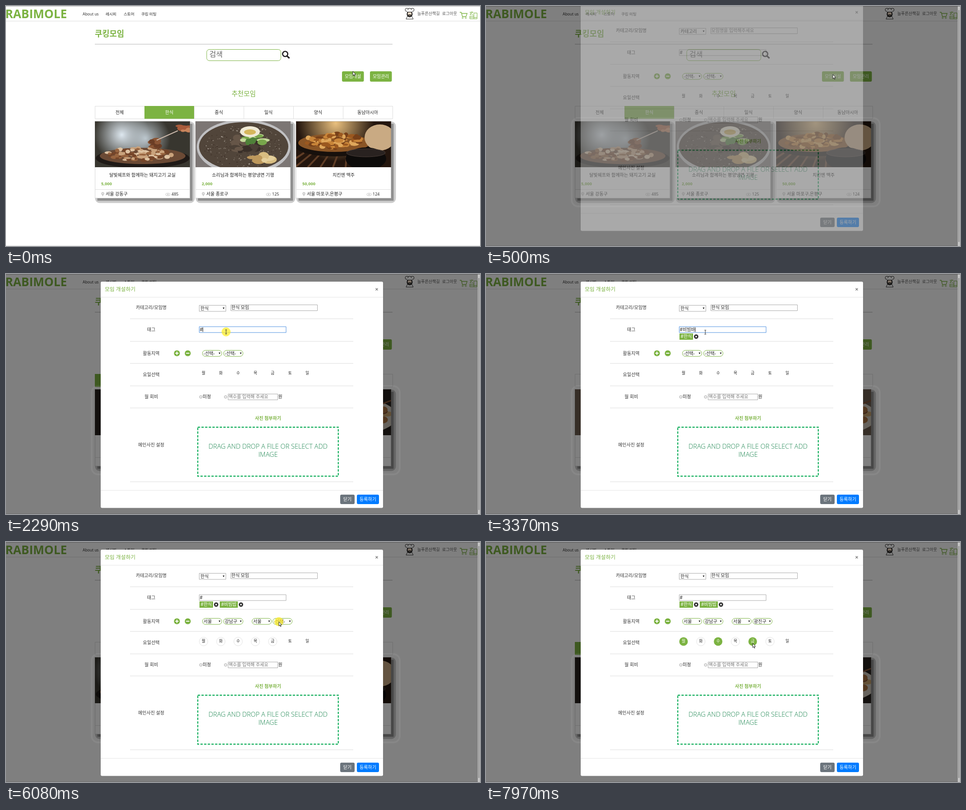
Write an HTML page with a canvas that moves like this. It is 1051 by 533 pixels and loops after 8000 ms.

```html
<!DOCTYPE html>
<html lang="ko">
<head>
<meta charset="utf-8">
<style>
html, body { margin: 0; width: 100%; height: 100%; overflow: hidden; background: #fff }
canvas { display: block }
</style>
</head>
<body>
<canvas id="stage" width="1051" height="533"></canvas>
<script>
const stage = document.getElementById('stage').getContext('2d');
const sheet = new OffscreenCanvas(1051, 533).getContext('2d');
const LOOP = 8000, GREEN = '#7cb342', TAU = Math.PI * 2;
const FONT = '"Open Sans", "Noto Sans CJK KR", "Noto Sans CJK", sans-serif';
let g = stage;

// ---- drawing helpers ----
function text(s, x, y, size, color = '#222', align = 'left', weight = 400) {
  g.font = `${weight} ${size}px ${FONT}`;
  g.textAlign = align;
  g.textBaseline = 'middle';
  g.fillStyle = color;
  g.fillText(s, x, y);
  return g.measureText(s).width;
}
function paint(fill, stroke, width) {
  if (fill) { g.fillStyle = fill; g.fill(); }
  if (stroke) { g.strokeStyle = stroke; g.lineWidth = width; g.stroke(); }
}
function rect(x, y, w, h, fill) { g.fillStyle = fill; g.fillRect(x, y, w, h); }
function box(x, y, w, h, r, fill, stroke, width = 1) {
  g.beginPath();
  g.roundRect(x, y, w, h, r);
  paint(fill, stroke, width);
}
function oval(x, y, rx, ry, fill, stroke, width = 1) {
  g.beginPath();
  g.ellipse(x, y, rx, ry, 0, 0, TAU);
  paint(fill, stroke, width);
}
function poly(points, fill, stroke, width = 1, closed = true) {
  g.beginPath();
  for (let i = 0; i < points.length; i += 2) g.lineTo(points[i], points[i + 1]);
  if (closed) g.closePath();
  paint(fill, stroke, width);
}
function line(points, color, width = 1) { poly(points, null, color, width, false); }
function cross(x, y, r, color, width) {
  line([x - r, y - r, x + r, y + r], color, width);
  line([x + r, y - r, x - r, y + r], color, width);
}
function random(seed) {
  return () => (seed = seed * 16807 % 2147483647) / 2147483647;
}
function pile(n, x, y, rx, ry, size, colors) {
  const r = random(n * 997 + rx);
  for (let i = 0; i < n; i++) {
    const a = r() * TAU, d = Math.sqrt(r());
    oval(x + Math.cos(a) * d * rx, y + Math.sin(a) * d * ry,
      size * (.5 + r()), size * (.3 + r() * .5), colors[i % colors.length]);
  }
}
function glow(x, y, r, rgb, alpha) {
  const grad = g.createRadialGradient(x, y, 0, x, y, r);
  grad.addColorStop(0, `rgba(${rgb},${alpha})`);
  grad.addColorStop(1, `rgba(${rgb},0)`);
  rect(0, 0, 211, 102, grad);
}

// ---- food pictures, each 211 x 102 ----
function grill() {
  rect(0, 0, 211, 102, '#38362f');
  glow(60, 30, 62, '222,232,240', 1);
  glow(112, 38, 55, '200,212,220', .9);
  oval(106, 82, 104, 22, '#1f1a17');
  oval(106, 77, 95, 18, '#6b4a35');
  pile(110, 98, 73, 72, 14, 6, ['#98643f', '#c9a27c', '#754529', '#dec3a3']);
  pile(9, 131, 50, 10, 12, 9, ['#6b3d25', '#8a5535']);
  line([137, 42, 184, 21], '#cbb9ab', 2);
  pile(10, 197, 16, 13, 9, 8, ['#c8845c', '#a95c3c']);
}
function noodles() {
  rect(0, 0, 211, 102, '#7c7674');
  oval(107, 57, 104, 61, '#c0c0c2');
  oval(107, 56, 99, 54, '#51453a');
  pile(240, 107, 56, 88, 47, 1.4, ['#82776c', '#3e3028', '#a39a8f']);
  pile(40, 112, 50, 30, 19, 10, ['#4b4036', '#665648', '#3a3029']);
  pile(12, 128, 42, 24, 12, 10, ['#78a64b', '#c4d99a', '#4f8139']);
  oval(121, 23, 22, 12, '#efe9d5');
  oval(121, 24, 13, 6, '#d5b65c');
  pile(9, 146, 82, 25, 9, 12, ['#d8bd81', '#e4cf9c', '#bd985c']);
}
function chicken() {
  rect(0, 0, 211, 102, '#24160e');
  glow(88, 4, 85, '244,201,132', .95);
  for (let i = 0; i < 7; i++) line([i * 28 - 30, 102, i * 19 + 18, 70], '#5f3d26', 4);
  oval(85, 54, 88, 24, '#17100c');
  oval(85, 48, 80, 20, '#8a5526');
  pile(90, 85, 43, 66, 16, 7, ['#c98539', '#9b581f', '#dfa75b', '#774019']);
  oval(186, 36, 34, 29, '#c9aa83');
  oval(155, 83, 45, 25, '#0d0b0a');
  oval(155, 70, 43, 9, '#292220', '#4d403a');
}
function dish(tab) {
  rect(0, 0, 211, 102, `hsl(28 16% ${13 + tab * 12}%)`);
  oval(120, 60, 104, 42, '#cfc8bb');
  pile(50, 120, 57, 84, 27, 10, [0, 15, 30].map(d => `hsl(${20 + d / 2} 45% ${30 + d}%)`));
  line([150, 48, 211, 25], '#805033', 3);
}

// ---- page ----
const TABS = ['전체', '한식', '중식', '일식', '양식', '동남아시아'];
const CARDS = [
  ['달빛쉐프와 함께하는 돼지고기 교실', '5,000', '서울 강동구', 485, grill],
  ['소리님과 함께하는 평양냉면 기행', '2,000', '서울 종로구', 125, noodles],
  ['치킨엔 맥주', '50,000', '서울 마포구,은평구', 124, chicken]
];
const activeTab = t => +'10253140'[Math.max(0, Math.floor((t - 1980) / 970) + 1)];

function header() {
  rect(0, 0, 1051, 1.5, '#ccc');
  rect(0, 33, 1051, 1, '#ddd');
  rect(0, 532, 1051, 1, '#ddd');
  text('RABIMOLE', -1.5, 20.5, 26.2, GREEN, 'left', 700);
  [['About us', 170], ['레시피', 221], ['스토어', 261], ['쿠킹 미팅', 300]]
    .forEach(([s, x]) => text(s, x, 18.5, 8.5, '#222', 'left', 500));
  // chef avatar
  poly([887, 29, 890, 23, 900, 23, 903, 29], '#fff', '#222');
  oval(895, 18, 6.5, 7, '#222');
  oval(895, 17.5, 4.3, 4.5, '#f0d9c4');
  rect(892, 19, 6, 2, '#222');
  for (const x of [889, 901, 895]) oval(x, 8.5, 4, 3.5, '#fff', '#222');
  rect(889, 9, 12, 4, '#fff');
  line([889, 13.5, 901, 13.5], '#222', 1.2);
  text('늘푸른산책길', 912, 18, 9, '#555');
  text('로그아웃', 967, 18, 9, '#555');
  // cart and shop
  line([1006, 14, 1009.5, 14, 1012, 23.5, 1020, 23.5, 1022.5, 16.5, 1010.5, 16.5], GREEN, 1.3);
  for (const x of [1012.5, 1019.5]) oval(x, 26.5, 1.4, 1.4, null, GREEN);
  line([1028, 14, 1036, 14, 1032, 13, 1029, 20, 1032, 17, 1036, 20], GREEN);
  box(1037.5, 15.5, 7, 13, 0, null, GREEN);
  box(1028.5, 22.5, 9, 6, 0, null, GREEN);
  line([1029, 25.5, 1045, 25.5], GREEN);
}

function card([title, price, place, views, photo], i, tab) {
  g.save();
  g.translate(197 + i * 223, 256);
  rect(0, 0, 211, 171, '#fff');
  g.save();
  g.beginPath();
  g.rect(0, 0, 211, 102);
  g.clip();
  tab === 1 ? photo() : dish(tab);
  g.restore();
  box(.5, .5, 210, 170, 0, null, 'rgba(120,120,120,.3)');
  text(title, 105.5, 120.5, 10.1, '#222', 'center');
  text(price, 14, 139.5, 9.2, GREEN, 'left', 700);
  rect(0, 151, 211, 1, '#ddd');
  poly([14.5, 161, 17.5, 167, 20.5, 161], '#ccc');
  oval(17.5, 160.5, 3.2, 3.2, '#ccc');
  oval(17.5, 160.5, 1.1, 1.1, '#fff');
  text(place, 24, 162.5, 10);
  oval(162, 162.5, 4.8, 3, null, '#ccc', 1.2);
  oval(162, 162.5, 1.7, 1.7, '#ccc');
  text(views, 170, 162.5, 9);
  g.restore();
}

function page(tab) {
  rect(0, 0, 1051, 533, '#fff');
  header();
  text('쿠킹모임', 197, 63, 17.7, GREEN, 'left', 700);
  rect(197, 84, 660, 1.5, '#ccc');
  box(445, 96.5, 164.5, 25, 6, '#fff', GREEN);
  text('검색', 451, 109, 16, '#666');
  oval(619, 106.5, 5.7, 5.7, null, '#222', 2.6);
  line([623, 111, 628.5, 116], '#222', 3.2);
  [['모임개설', 745], ['모임관리', 807]].forEach(([s, x]) => {
    box(x, 145, 48.5, 23, 3, GREEN);
    text(s, x + 24.2, 157, 9.8, '#fff', 'center');
  });
  text('추천모임', 527, 196.5, 14.6, GREEN, 'center');
  TABS.forEach((s, i) => {
    box(197.5 + i * 110, 222.5, 110, 28, 0, '#fff', '#ddd');
    if (i === tab) rect(197 + i * 110, 222, 110, 28.5, GREEN);
    text(s, 252 + i * 110, 237, 10, i === tab ? '#fff' : '#222', 'center');
  });
  for (const [spread, color] of [[5, '#ccc'], [0, '#8f8f8f']])
    CARDS.forEach((c, i) =>
      box(202.5 + i * 223 - spread, 261.5 - spread, 211 + spread * 2, 171 + spread * 2, spread * 2, color));
  CARDS.forEach((c, i) => card(c, i, tab));
}

// ---- script of the visit ----
const ROW = 13.28, PICK = '-선택-';
const KINDS = ['카테고리', ...TABS.slice(1), '기타'];
const CITIES = [PICK, ...'서울 부산 대구 인천 광주 대전 울산 강원 경기 경남 경북 전남 전북 제주 충남 충북'.split(' ')];
const DISTRICTS = [PICK, ...('강남구 강동구 강북구 강서구 관악구 광진구 구로구 금천구 노원구 도봉구 동대문구 ' +
  '동작구 마포구 서대문구 서초구 성동구 성북구 송파구 양천구').split(' ')];

const menu = (opened, picked, x, y, w, mouseX, items, choice) =>
  ({ opened, picked, x, y, w, mouseX, items, choice });
const MENUS = [
  menu(1090, 1430, 428, 83, 60, 452, KINDS, '한식'),
  menu(4050, 4490, 435, 183, 44, 463, CITIES, '서울'),
  menu(4660, 5250, 482, 183, 44, 502, DISTRICTS, '강남구'),
  menu(5690, 5900, 545, 183, 44, 562, CITIES, '서울'),
  menu(6070, 6750, 591, 183, 44, 605, DISTRICTS, '광진구')
];
const isOpen = (m, t) => t >= m.opened + 90 && t < m.picked;
const valueOf = (m, t) => t < m.picked ? m.items[0] : m.choice;
const listWidth = m => m.w + (m.items === DISTRICTS ? 8 : 0);

const NAME_AT = 1600, TAG_AT = 2240, PLUS_AT = 3640;
const DAYS_AT = { 0: 7100, 2: 7390, 4: 7750 };
const dayX = i => 438 + i * 38.33;

// every click as time, x, y
const CLICKS = [
  [-120, 769, 143], [80, 769, 152], [NAME_AT, 510, 76], [TAG_AT, 488, 128.5], [PLUS_AT, 379, 176],
  ...MENUS.flatMap(m => [
    [m.opened, m.mouseX, m.y - 6],
    [m.picked, m.mouseX, m.y + (m.items.indexOf(m.choice) + .5) * ROW]
  ]),
  ...Object.entries(DAYS_AT).map(([i, t]) => [t, dayX(+i), 225])
].sort((a, b) => a[0] - b[0]);

// the pointer rests after a click and glides just before the next one
function pointerAt(t) {
  const next = CLICKS.findIndex(c => c[0] > t);
  if (next < 0) return CLICKS.at(-1).slice(1);
  const [t0, x0, y0] = CLICKS[next - 1], [t1, x1, y1] = CLICKS[next];
  const start = Math.max(t0 + 90, t1 - 290), p = ramp(t, start, t1 - 10 - start), e = p * p * (3 - 2 * p);
  return [x0 + (x1 - x0) * e, y0 + (y1 - y0) * e];
}

// Korean input: each syllable grows from consonant to full block
function keystrokes(words) {
  const out = [''];
  let done = '';
  for (const c of words) {
    const code = c.charCodeAt(0), n = code - 0xAC00;
    if (n >= 0) {
      out.push(done + 'ㄱㄲㄴㄷㄸㄹㅁㅂㅃㅅㅆㅇㅈㅉㅊㅋㅌㅍㅎ'[Math.floor(n / 588)]);
      if (n % 28) out.push(done + String.fromCharCode(code - n % 28));
    }
    out.push(done += c);
  }
  return out;
}
function typed(words, t, start, gap) {
  const keys = keystrokes(words);
  return keys[Math.max(0, Math.min(keys.length - 1, Math.floor((t - start) / gap)))];
}
const CHIPS = [
  { word: '한식', start: 2330, end: 2520, x: 429, w: 30 },
  { word: '비빔밥', start: 3110, end: 3450, x: 474, w: 40 }
];

// ---- dialog ----
function arrowDown(x, y) { poly([x - 2, y - 1.6, x + 2, y - 1.6, x, y + 2], '#111'); }
function field(x, y, w, value, hint, focused) {
  box(x + .5, y + .5, w - 1, 13, 0, '#fff', focused ? '#4a8fe0' : '#aaa');
  const width = text(value || hint, x + 1.5, y + 7.5, 10, value ? '#222' : '#777');
  if (focused) rect(x + 1.5 + (value ? width : 0), y + 2, 1, 10, '#111');
}
function select(m, t, radius, color) {
  box(m.x + .5, m.y - 13.5, m.w - 1, 13.5, radius, '#fff', color);
  text(valueOf(m, t), m.x + 3, m.y - 6, 10);
  arrowDown(m.x + m.w - 5.5, m.y - 7);
}
function button(x, w, s, color) {
  box(x, 490, w, 21, 3, color);
  text(s, x + w / 2, 501, 10, '#fff', 'center');
}
function chip({ word, x, w }) {
  rect(x, 132, w, 14, GREEN);
  text('#' + word, x + w / 2, 139.5, 10, '#fff', 'center');
  oval(x + w + 7, 139, 4.8, 4.8, '#222');
  cross(x + w + 7, 139, 1.8, '#fff', 1.4);
}
function day(s, i, t) {
  const x = dayX(i), on = t >= DAYS_AT[i];
  const ringed = MENUS.some(m => m.y > 180 && t >= m.picked && x + 9 > m.x && x - 9 < m.x + listWidth(m));
  oval(x, 221, 9.5, 9.5, on ? GREEN : '#fff', ringed && !on ? '#e2e2e2' : null);
  text(s, x, 220.5, 8.7, on ? '#fff' : '#222', 'center');
}

function dialog(t) {
  const [kind, ...regions] = MENUS;
  box(210, 17, 626, 502.5, 3, '#fff');
  text('모임 개설하기', 219, 34.5, 11.8, GREEN);
  cross(822, 34, 2.5, '#777', 1.3);
  for (const y of [51, 480]) rect(210, y, 626, 1, '#e5e5e5');
  for (const y of [99, 149, 198, 248, 297, 461]) rect(275, y, 495, 1, '#ddd');
  [['카테고리/모임명', 75], ['태그', 124], ['활동지역', 177], ['요일선택', 224], ['월 회비', 273.5], ['메인사진 설정', 380]]
    .forEach(([s, y]) => text(s, 322, y, 10, '#333', 'center'));

  select(kind, t, 0, '#aaa');
  field(498, 68, 193, typed('한식 모임', t, 1640, 38), '모임명을 입력해주세요', t >= NAME_AT && t < TAG_AT);
  const typing = CHIPS.find(c => t >= c.start && t < c.end);
  field(428, 116.5, 193.5, '#' + (typing ? typed(typing.word, t, typing.start, 35) : ''), '', t >= TAG_AT && t < PLUS_AT);
  CHIPS.filter(c => t >= c.end).forEach(chip);

  for (const x of [379, 403]) {
    oval(x, 176, 6.6, 6.6, GREEN);
    rect(x - 3.6, 175, 7.2, 2, '#fff');
  }
  rect(378, 172.4, 2, 7.2, '#fff');
  regions.slice(0, t < PLUS_AT ? 2 : 4).forEach(m => select(m, t, 7, GREEN));
  [...'월화수목금토일'].forEach((s, i) => day(s, i, t));

  for (const x of [432, 487]) oval(x, 273, 3, 3, '#eee', '#aaa');
  text('미정', 436, 273.5, 10);
  field(492, 266, 111, '', '액수를 입력해 주세요', false);
  text('원', 603.5, 273.5, 10);

  text('사진 첨부하기', 581, 321.5, 10, GREEN, 'center', 700);
  g.setLineDash([5.2, 2.9]);
  box(425.2, 340.2, 311.6, 108.8, 0, null, '#1fb264', 2.4);
  g.setLineDash([]);
  text('DRAG AND DROP A FILE OR SELECT ADD', 581, 384.5, 14.5, '#15824b', 'center', 300);
  text('IMAGE', 581, 402.5, 14.5, '#15824b', 'center', 300);
  button(741, 32, '닫기', '#6c757d');
  button(778, 49, '등록하기', '#007bff');
}

function list(m, mouseY) {
  const { x, y, items } = m, w = listWidth(m), h = items.length * ROW;
  const hot = Math.max(0, Math.min(items.length - 1, Math.floor((mouseY - y) / ROW)));
  box(x + .5, y + .5, w - 1, h, 0, '#fff', '#7ba4d8');
  rect(x + 1, y + 1 + hot * ROW, w - 2, ROW - .5, '#1e90ff');
  items.forEach((s, i) => text(s, x + 3, y + 7.5 + i * ROW, 10, i === hot ? '#fff' : '#222'));
  if (w > m.w) {
    rect(x + w - 7, y + 1, 6, h - 1, '#f1f1f1');
    rect(x + w - 6, y + 7, 4, h * .7, '#c1c1c1');
  }
}

function pointer(t, x, y) {
  if (CLICKS.some(([c]) => t >= c && t < c + 100)) oval(x, y, 10, 10, 'rgba(255,236,30,.7)');
  g.save();
  g.translate(x, y);
  if (t > NAME_AT - 30 && t < PLUS_AT - 120) {
    line([0, -4, 0, 4], '#333');
    for (const end of [-4.5, 4.5]) line([-2, end, 2, end], '#333');
  } else {
    poly([0, 0, 0, 9.3, 2.1, 7.4, 3.6, 10.8, 5, 10.2, 3.5, 6.9, 6.4, 6.9], '#fff', '#111', .9);
  }
  g.restore();
}

// ---- playback ----
function ramp(t, start, length) { return Math.max(0, Math.min(1, (t - start) / length)); }

function backdrop(amount) {
  rect(0, 0, 1051, 533, `rgba(0,0,0,${amount / 2})`);
  g.globalAlpha = amount;
  box(190, 249, 683, 196, 14, null, 'rgba(255,255,255,.06)', 4);
  rect(1046, 1, 5, 532, '#c4c4c4');
  rect(1047, 9, 3, 515, '#9a9a9a');
  g.globalAlpha = 1;
}
function draw(t) {
  const [x, y] = pointerAt(t), dim = ramp(t, 260, 150), shown = ramp(t, 430, 215);
  page(activeTab(t));
  if (dim) backdrop(dim);
  if (shown) {
    // painted apart so that the whole dialog fades as one layer
    g = sheet;
    g.clearRect(0, 0, 1051, 533);
    dialog(t);
    g = stage;
    g.globalAlpha = shown;
    g.drawImage(sheet.canvas, 0, Math.round(-39 * (1 - ramp(t, 415, 300)) ** 2));
    g.globalAlpha = 1;
  }
  const open = MENUS.find(m => isOpen(m, t));
  if (open) list(open, y);
  pointer(t, x, y);
}
function frame() {
  draw(performance.now() % LOOP);
  requestAnimationFrame(frame);
}
frame();
</script>
</body>
</html>
```
